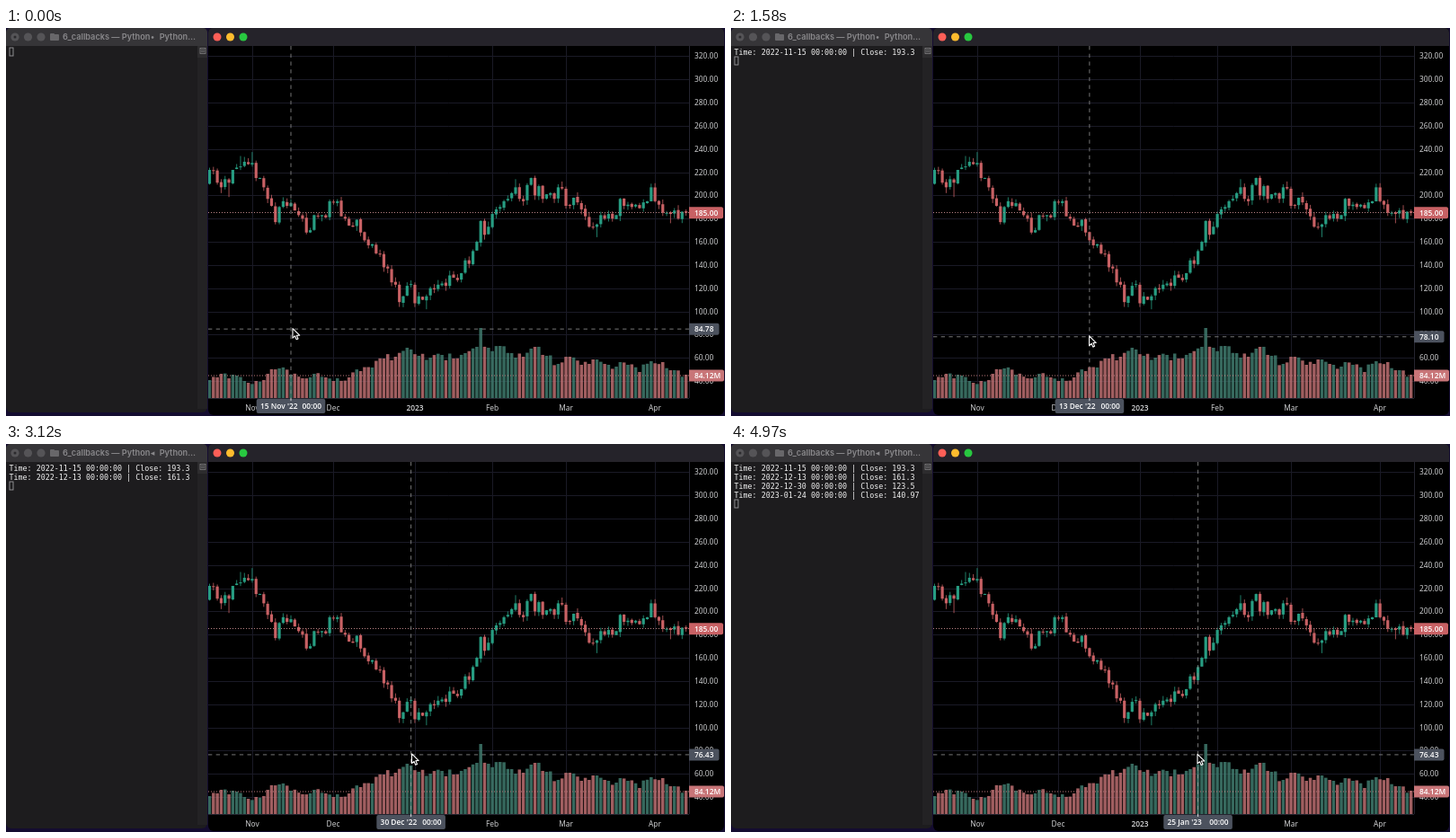
An HTML page with a canvas that plays this animation: 800x432 px, repeating every 5 s.

```html
<!DOCTYPE html>
<html lang="en">
<head>
<meta charset="utf-8">
<title>Chart callbacks</title>
<style>
  html, body { margin: 0; width: 100%; height: 100%; overflow: hidden; background: #0d0820; }
  canvas { display: block; width: 800px; height: 432px; }
</style>
</head>
<body>
<canvas id="stage" width="800" height="432"></canvas>
<script>
const LOOP = 5000;
const UP = '#279d82', DOWN = '#c86164', GREY = '#4c525e';
const LABEL_FONT = '8.4px "Open Sans", "Noto Sans", sans-serif';
const BOLD_FONT = '600 ' + LABEL_FONT;
const MONO_FONT = '8.35px "DejaVu Sans Mono", monospace';
const TITLE_FONT = '600 9.2px Inter, "DejaVu Sans", sans-serif';
const LEFT = 225, TOP = 20, AXIS_X = 760, AXIS_Y = 412;

const barX = i => 226.5 + i * 4.31;
const priceY = p => 315.5 - (p - 100) * 1.291;
const noise = n => { const v = Math.sin(n * 12.9898 + 4.1) * 43758.5453; return v - Math.floor(v); };

// Daily closes; each bar opens near the previous close.
const closes = [
  222, 221, 211, 207, 214, 211, 222, 224, 225, 229, 227, 228, 215, 215, 207, 197, 191, 177, 190, 195,
  191, 193.3, 187, 183, 180, 168, 170, 183, 182, 183, 181, 195, 194, 195, 182, 180, 174, 173, 179, 168,
  161.3, 157, 158, 150, 149, 138, 137, 125, 123, 108, 113, 122, 123.5, 107, 113, 110, 113, 120, 119, 123,
  124, 122, 131, 129, 127, 133, 144, 141, 152, 160, 178, 166, 173, 184, 188, 190, 195, 197, 202, 207,
  197, 195, 209, 215, 200, 208, 197, 201, 202, 197, 207, 206, 191, 191, 198, 194, 188, 182, 173, 173,
  175, 183, 180, 184, 180, 183, 197, 191, 192, 190, 192, 189, 194, 195, 207, 195, 192, 185, 185, 184,
  187, 180, 186, 185
];
const highs = { 8: 234, 11: 237.4, 79: 214, 84: 217, 91: 212, 121: 191.6 };
const lows = { 3: 202, 5: 198.6, 17: 175, 56: 101.8, 100: 164, 119: 176 };

// Volume heights at every third bar, interpolated between.
const volumePoints = [
  20, 27, 26, 19, 19, 27, 33, 26, 22, 27, 23, 22, 23, 30, 34, 44, 46, 56, 47, 45, 48,
  44, 50, 57, 56, 58, 50, 46, 57, 47, 38, 46, 37, 43, 38, 35, 37, 29, 41, 40, 31, 26
];
function volume(i) {
  if (i === 70) return 78;
  const k = Math.floor(i / 3), f = i % 3 / 3;
  if (!f) return volumePoints[k];
  return volumePoints[k] * (1 - f) + volumePoints[k + 1] * f + (noise(i + 300) - 0.5) * 9;
}

const bars = closes.map((close, i) => {
  const open = i ? closes[i - 1] + (noise(i) - 0.5) * 1.6 : 210;
  return {
    open, close,
    high: highs[i] || Math.max(open, close) + noise(i + 100) * 4.5,
    low: lows[i] || Math.min(open, close) - noise(i + 200) * 4.5,
    up: close >= open
  };
});

const holidays = ['2022-11-24', '2022-12-26', '2023-01-02', '2023-01-16'];
function barDate(index) {
  const d = new Date(Date.UTC(2022, 9, 17));
  while (index > 0) {
    d.setUTCDate(d.getUTCDate() + 1);
    const closed = d.getUTCDay() % 6 === 0 || holidays.includes(d.toISOString().slice(0, 10));
    if (!closed) index--;
  }
  const month = 'JanFebMarAprMayJunJulAugSepOctNovDec'.substr(d.getUTCMonth() * 3, 3);
  return `${String(d.getUTCDate()).padStart(2, '0')} ${month} '${d.getUTCFullYear() % 100}`;
}

const log = [
  [480, 'Time: 2022-11-15 00:00:00 | Close: 193.3'],
  [1980, 'Time: 2022-12-13 00:00:00 | Close: 161.3'],
  [3200, 'Time: 2022-12-30 00:00:00 | Close: 123.5'],
  [4400, 'Time: 2023-01-24 00:00:00 | Close: 140.97']
];

// Pointer path: time, x, price level.
const path = [
  [0, 319, 84.78], [400, 319, 84.78], [620, 326, 84.22], [760, 326.5, 84.22],
  [1180, 381, 79.77], [1500, 398, 78.4], [1850, 399.5, 78.1], [2000, 399.5, 78.1],
  [2150, 406, 78.1], [2580, 446, 76.43], [2800, 451, 76.43], [3450, 452, 76.99],
  [3640, 465, 76.99], [4060, 515.5, 76.43], [4650, 515.5, 76.43], [4800, 519, 76.43], [5000, 519, 76.43]
];
// Monotone cubic interpolation along one column of the path.
function track(t, col) {
  t = Math.max(0, t);
  let k = 0;
  while (k < path.length - 2 && path[k + 1][0] <= t) k++;
  const rise = j => path[j + 1] && path[j] ? (path[j + 1][col] - path[j][col]) / (path[j + 1][0] - path[j][0]) : 0;
  const slope = j => { const a = rise(j - 1), b = rise(j); return a * b > 0 ? 2 * a * b / (a + b) : 0; };
  const h = path[k + 1][0] - path[k][0], s = (t - path[k][0]) / h, r = 1 - s;
  return path[k][col] * (1 + 2 * s) * r * r + slope(k) * h * s * r * r +
    path[k + 1][col] * s * s * (3 - 2 * s) - slope(k + 1) * h * s * s * r;
}

function rect(c, x, y, w, h, fill, radius = 0) {
  c.fillStyle = fill;
  c.beginPath();
  c.roundRect(x, y, w, h, radius);
  c.fill();
}
function dot(c, x, y, r, fill) {
  c.fillStyle = fill;
  c.beginPath();
  c.arc(x, y, r, 0, 7);
  c.fill();
}
function line(c, x1, y1, x2, y2, stroke, dash = [], width = 1) {
  c.strokeStyle = stroke;
  c.lineWidth = width;
  c.setLineDash(dash);
  c.beginPath();
  c.moveTo(x1, y1);
  c.lineTo(x2, y2);
  c.stroke();
  c.setLineDash([]);
}
function text(c, str, x, y, font, fill, align = 'left') {
  c.font = font;
  c.fillStyle = fill;
  c.textAlign = align;
  c.fillText(str, x, y);
}
function priceTag(c, str, y, w, fill) {
  rect(c, AXIS_X, y - 6.5, w, 13, fill, [0, 2, 2, 0]);
  text(c, str, 766, y + 3, BOLD_FONT, '#fff');
}

function drawTerminal(c) {
  rect(c, 0, 0, 224, 428, '#1d1c1e', [5, 5, 6, 6]);
  rect(c, 0, 0, 224, 20, '#363538', [5, 5, 0, 0]);
  rect(c, 213, 20, 11, 404, '#232224');
  rect(c, 213, 20, 11, 13, '#2d2c2e');
  for (const x of [10, 24.5, 39]) dot(c, x, 10, 4.6, '#555457');
  dot(c, 10, 10, 1.5, '#2b2a2d');
  rect(c, 49, 6, 5, 3, '#68676a', 1);
  rect(c, 49, 7, 10, 7, '#68676a', 1);
  c.strokeStyle = '#858487';
  c.lineWidth = 0.8;
  c.strokeRect(216, 22.5, 6, 6);
  for (const y of [24.5, 26.5]) line(c, 217, y, 221, y, '#858487', [], 0.8);
  text(c, '6_callbacks — Python', 63, 13.2, TITLE_FONT, '#89888b');
  text(c, 'Python…', 211, 13.2, TITLE_FONT, '#89888b', 'right');
}

function drawChart(c) {
  rect(c, LEFT, 0, 574, 431, '#000', [5, 5, 6, 6]);
  rect(c, LEFT, 0, 574, TOP, '#25232a', [5, 5, 0, 0]);
  [['#fe5f57', 235], ['#febc2e', 249.5], ['#28c840', 264]].forEach(([col, x]) => dot(c, x, 10, 4.5, col));

  const ticks = [['Nov', 274], ['Dec', 364], ['2023', 455], ['Feb', 541], ['Mar', 623], ['Apr', 722]];
  for (const [name, x] of ticks) {
    line(c, x + 0.5, TOP, x + 0.5, AXIS_Y, '#1a1a26');
    text(c, name, x, 426, name === '2023' ? BOLD_FONT : LABEL_FONT, '#d8d9db', 'center');
  }
  for (let p = 40; p <= 320; p += 20) {
    const y = priceY(p);
    line(c, LEFT, Math.round(y) + 0.5, AXIS_X, Math.round(y) + 0.5, '#1a1a26');
    text(c, p.toFixed(2), 766, y + 3, LABEL_FONT, '#d8d9db');
  }
  line(c, AXIS_X + 0.5, TOP, AXIS_X + 0.5, AXIS_Y, '#24242f');
  line(c, LEFT, AXIS_Y + 0.5, AXIS_X, AXIS_Y + 0.5, '#24242f');

  c.save();
  c.beginPath();
  c.rect(LEFT, TOP, AXIS_X - LEFT, AXIS_Y - TOP);
  c.clip();
  bars.forEach((b, i) => {
    const h = volume(i);
    rect(c, barX(i) - 1.75, AXIS_Y - h, 3.5, h, b.up ? 'rgba(68,130,117,.8)' : 'rgba(200,118,121,.8)');
  });
  bars.forEach((b, i) => {
    const x = barX(i), col = b.up ? UP : DOWN;
    const top = priceY(Math.max(b.open, b.close)), bottom = priceY(Math.min(b.open, b.close));
    line(c, x, priceY(b.high), x, priceY(b.low), col, [], 0.8);
    rect(c, x - 1.6, top, 3.2, Math.max(1, bottom - top), col);
  });
  c.restore();

  line(c, LEFT, 205.5, AXIS_X, 205.5, '#b98284', [1, 2]);
  line(c, LEFT, 387, AXIS_X, 387, '#b9797c', [1, 2]);
  priceTag(c, '185.00', 205.8, 38, DOWN);
  priceTag(c, '84.12M', 387, 39, '#c87578');
}

function drawPointer(c, x, y) {
  c.save();
  c.translate(x, y);
  c.beginPath();
  [[0, 0], [0, 10.6], [2.5, 8.4], [4.2, 12.2], [6, 11.4], [4.4, 7.7], [7.7, 7.6]].forEach(p => c.lineTo(...p));
  c.closePath();
  c.lineJoin = 'round';
  c.lineWidth = 1.1;
  c.fillStyle = '#000';
  c.strokeStyle = '#fff';
  c.fill();
  c.stroke();
  c.restore();
}

const stage = document.getElementById('stage').getContext('2d');
const backdrop = document.createElement('canvas');
backdrop.width = 800;
backdrop.height = 432;
const back = backdrop.getContext('2d');
rect(back, 0, 0, 800, 432, '#140c30');
drawTerminal(back);
drawChart(back);

function draw(t) {
  const c = stage;
  c.drawImage(backdrop, 0, 0);
  text(c, t < 2300 ? '•' : '◂', 163, 13.2, TITLE_FONT, '#89888b', 'center');

  const lines = log.filter(entry => t >= entry[0]);
  lines.forEach((entry, i) => text(c, entry[1], 3.5, 30 + i * 10, MONO_FONT, '#f2f2f2'));
  c.strokeStyle = '#9a999c';
  c.lineWidth = 0.9;
  c.strokeRect(4, 22 + lines.length * 10, 4, 9);

  // The crosshair trails the pointer and snaps to bars and price steps.
  const index = Math.round((track(t - 60, 1) - barX(0)) / 4.31);
  const price = 76.43 + Math.round((track(t, 2) - 76.43) / 0.5565) * 0.5565;
  const x = barX(index), y = priceY(price);
  line(c, x, TOP, x, AXIS_Y, '#858585', [4.35, 4.35], 0.9);
  line(c, LEFT, y, AXIS_X, y, '#858585', [4.35, 4.35], 0.9);
  priceTag(c, price.toFixed(2), y, 33.5, GREY);
  rect(c, x - 38.3, 413, 76.6, 16, GREY, 2);
  line(c, x, 412, x, 415, '#fff', [], 0.8);
  text(c, barDate(index), x - 34, 424.3, BOLD_FONT, '#fff');
  text(c, '00:00', x + 34, 424.3, BOLD_FONT, '#fff', 'right');

  drawPointer(c, track(t, 1), priceY(track(t, 2)) - 0.6);
}

function tick() {
  draw(performance.now() % LOOP);
  requestAnimationFrame(tick);
}
tick();
</script>
</body>
</html>
```
